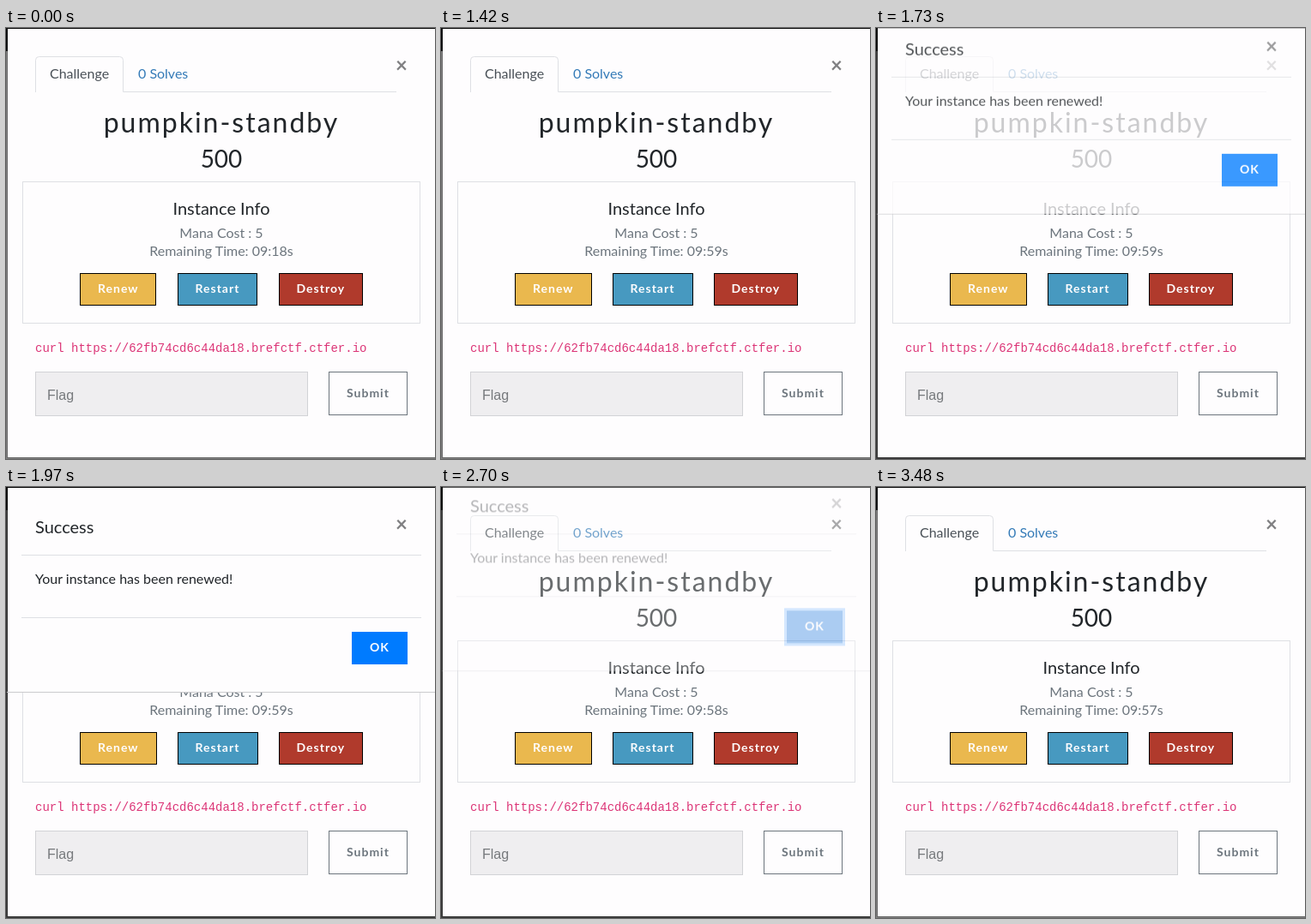
These frames come from a looping animation (500x503 px, 3940 ms). An HTML page:

```html
<!DOCTYPE html>
<html lang="en">
<head>
<meta charset="utf-8">
<title>Challenge dialog</title>
<style>
  html, body { margin: 0; width: 100%; height: 100%; overflow: hidden; background: #7f7f7f; }
  svg { display: block; width: 500px; height: 503px; font: 16px Lato, sans-serif; }

  .ink { fill: #212529; }
  .muted { fill: #6c757d; }
  .mid { text-anchor: middle; }
  .h2 { font-size: 32px; letter-spacing: 2px; }
  .h3 { font-size: 28px; }
  .h5 { font-size: 20px; }
  .label { font-size: 14px; font-weight: 700; letter-spacing: 1px; fill: #fefdfe; }
  .close { font-size: 24px; font-weight: 700; fill: #7f7f81; text-anchor: middle; }
  .code { font: 14px "Liberation Mono", monospace; fill: #dc3577; }
  .field { font: 16px "Liberation Sans", sans-serif; fill: #76797c; }
  .paper { fill: #fefdfe; }
  .line { fill: none; stroke: #dee0e4; }
  .btn { stroke: #000; }

  /* Every animation shares one 3.94 s loop. */
  .shade, .renew, .restart, .tick, .alert, .ok, .ring {
    animation: 3.94s linear infinite;
  }

  .shade { animation-name: shade; }
  @keyframes shade {
    0%, 36.04% { opacity: 0; }
    39.85%, 69.9% { opacity: .5; }
    73.71%, 100% { opacity: 0; }
  }

  .renew { animation-name: renew; }
  .restart { animation-name: restart; }
  @keyframes renew {
    0%, 36.03% { width: 88px; }
    36.04%, 100% { width: 89px; }
  }
  @keyframes restart {
    0%, 36.03% { width: 92px; }
    36.04%, 100% { width: 93px; }
  }

  .tick { opacity: 0; animation-timing-function: step-end; }
  .t18 { animation-name: t18; }
  .t17 { animation-name: t17; }
  .t59 { animation-name: t59; }
  .t58 { animation-name: t58; }
  .t57 { animation-name: t57; }
  @keyframes t18 { 0% { opacity: 1; } 24.61% { opacity: 0; } }
  @keyframes t17 { 0% { opacity: 0; } 24.61% { opacity: 1; } 36.04% { opacity: 0; } }
  @keyframes t59 { 0% { opacity: 0; } 36.04% { opacity: 1; } 62.94% { opacity: 0; } }
  @keyframes t58 { 0% { opacity: 0; } 62.94% { opacity: 1; } 88.32% { opacity: 0; } }
  @keyframes t57 { 0% { opacity: 0; } 88.32%, 100% { opacity: 1; } }

  .alert { opacity: 0; animation-name: fade, slide; }
  @keyframes fade {
    0%, 40.99% { opacity: 0; }
    44.8%, 65.99% { opacity: 1; }
    69.8%, 100% { opacity: 0; }
  }
  @keyframes slide {
    0% { transform: translateY(-50px); }
    40.99% { transform: translateY(-50px); animation-timing-function: ease-out; }
    48.6% { transform: translateY(0); }
    65.99% { transform: translateY(0); animation-timing-function: ease-out; }
    73.6%, 100% { transform: translateY(-50px); }
  }

  .ok { fill: #007bff; animation-name: press; }
  @keyframes press {
    0%, 56.09% { fill: #007bff; }
    59.9%, 100% { fill: #0069d9; }
  }
  .ring { fill: none; stroke: #007bff; stroke-width: 3; opacity: 0; animation-name: ring; }
  @keyframes ring {
    0%, 56.09% { opacity: 0; }
    59.9%, 100% { opacity: .5; }
  }
</style>
</head>
<body>
<svg viewBox="0 0 500 503">
  <!-- page behind the dialogs -->
  <rect width="500" height="503" fill="#7f7f7f"/>
  <rect width="500" height="27" fill="#101112"/>
  <rect x="1" width="499" height="502" fill="#000" opacity=".2"/>
  <rect class="shade" width="500" height="503" fill="#000"/>

  <!-- challenge dialog -->
  <rect class="paper" x="2" y="1" width="498" height="500"/>
  <path class="line" d="M34.5 75V37.5a4 4 0 0 1 4-4H132.5a4 4 0 0 1 4 4V74.5H455"/>
  <text x="51" y="59" fill="#495057">Challenge</text>
  <text x="154" y="59" fill="#337ab7">0 Solves</text>
  <text class="close" x="461" y="52">×</text>

  <text class="ink mid h2" x="251" y="122">pumpkin-standby</text>
  <text class="ink mid h3" x="251" y="163">500</text>

  <rect class="line" x="19.5" y="179.5" width="463" height="165"/>
  <text class="ink mid h5" x="251" y="218">Instance Info</text>
  <text class="muted mid" x="251" y="245">Mana Cost : 5</text>
  <g class="muted mid">
    <text class="tick t18" x="251" y="266">Remaining Time: 09:18s</text>
    <text class="tick t17" x="251" y="266">Remaining Time: 09:17s</text>
    <text class="tick t59" x="251" y="266">Remaining Time: 09:59s</text>
    <text class="tick t58" x="251" y="266">Remaining Time: 09:58s</text>
    <text class="tick t57" x="251" y="266">Remaining Time: 09:57s</text>
  </g>

  <rect class="btn renew" x="86.5" y="286.5" width="88" height="37" fill="#eab84e"/>
  <rect class="btn restart" x="200.5" y="286.5" width="92" height="37" fill="#4799c0"/>
  <rect class="btn" x="318.5" y="286.5" width="97" height="37" fill="#b03a2c"/>
  <text class="label" x="107" y="309">Renew</text>
  <text class="label" x="220.5" y="309">Restart</text>
  <text class="label" x="338.5" y="309">Destroy</text>

  <text class="code" x="34" y="378">curl https://62fb74cd6c44da18.brefctf.ctfer.io</text>

  <rect x="34.5" y="401.5" width="317" height="51" fill="#efeef0" stroke="#d2d3d6"/>
  <text class="field" x="48" y="434">Flag</text>
  <rect class="paper" x="376.5" y="401.5" width="91" height="50" stroke="#6c757d"/>
  <text class="label" x="397" y="431" style="fill:#6c757d">Submit</text>

  <!-- success alert -->
  <g class="alert">
    <rect class="paper" x="2" y="1" width="498" height="238"/>
    <path d="M1 239.5H500" stroke="#cbcbcd"/>
    <text class="ink h5" x="34" y="54">Success</text>
    <text class="close" x="461" y="52">×</text>
    <path class="line" d="M18 79.5H484M18 152.5H484"/>
    <text class="ink" x="34" y="113">Your instance has been renewed!</text>
    <rect class="ring" x="401.5" y="167.5" width="68" height="41"/>
    <rect class="ok" x="403" y="169" width="65" height="38"/>
    <text class="label" x="424" y="192">OK</text>
  </g>
</svg>
</body>
</html>
```
